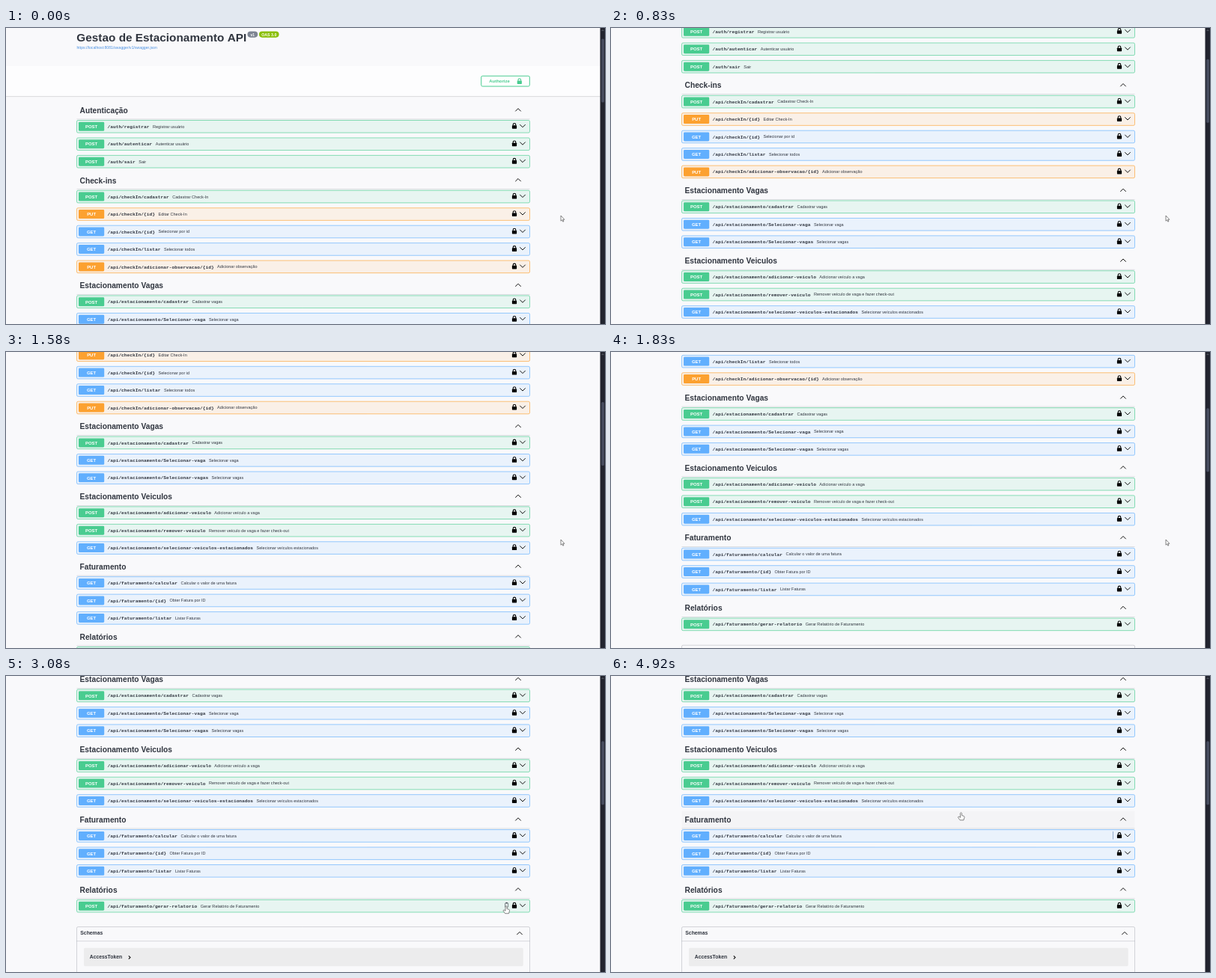
These frames come from a looping animation (800 by 396 pixels, 5 s). An HTML page with a canvas:

```html
<!DOCTYPE html>
<html lang="pt">
<head>
<meta charset="utf-8">
<title>API</title>
<style>
html, body { margin: 0; width: 100%; height: 100%; overflow: hidden; background: #f9f9fb; }
canvas { display: block; }
</style>
</head>
<body>
<canvas id="stage" width="800" height="396"></canvas>
<script>
const ctx = document.getElementById('stage').getContext('2d');
const SANS = '"Liberation Sans", Arial, sans-serif';
const MONO = '"Liberation Mono", monospace';
const INK = '#30353f', RULE = 'rgba(59,65,81,.26)', PAGE = '#f9f9fb';
const LEFT = 94.5, RIGHT = 699.5;
const LOOP = 5000, STEP = 1000 / 12;
const COLORS = { POST: '73,204,144', PUT: '252,161,48', GET: '97,175,254' };

const sections = [
  ['Autenticação',
    ['POST', '/auth/registrar', 'Registrar usuário'],
    ['POST', '/auth/autenticar', 'Autenticar usuário'],
    ['POST', '/auth/sair', 'Sair']],
  ['Check-ins',
    ['POST', '/api/checkIn/cadastrar', 'Cadastrar Check-In'],
    ['PUT', '/api/checkIn/{id}', 'Editar Check-In'],
    ['GET', '/api/checkIn/{id}', 'Selecionar por id'],
    ['GET', '/api/checkIn/listar', 'Selecionar todos'],
    ['PUT', '/api/checkIn/adicionar-observacao/{id}', 'Adicionar observação']],
  ['Estacionamento Vagas',
    ['POST', '/api/estacionamento/cadastrar', 'Cadastrar vagas'],
    ['GET', '/api/estacionamento/Selecionar-vaga', 'Selecionar vaga'],
    ['GET', '/api/estacionamento/Selecionar-vagas', 'Selecionar vagas']],
  ['Estacionamento Veiculos',
    ['POST', '/api/estacionamento/adicionar-veiculo', 'Adicionar veículo a vaga'],
    ['POST', '/api/estacionamento/remover-veiculo', 'Remover veículo de vaga e fazer check-out'],
    ['GET', '/api/estacionamento/selecionar-veiculos-estacionados', 'Selecionar veículos estacionados']],
  ['Faturamento',
    ['GET', '/api/faturamento/calcular', 'Calcular o valor de uma fatura'],
    ['GET', '/api/faturamento/{id}', 'Obter Fatura por ID'],
    ['GET', '/api/faturamento/listar', 'Listar Faturas']],
  ['Relatórios',
    ['POST', '/api/faturamento/gerar-relatorio', 'Gerar Relatório de Faturamento']]
];

// Lay headings and operations out down the page.
const items = [];
let flowY = 110;
for (const [title, ...ops] of sections) {
  items.push({ title, y: flowY });
  flowY += 21.8;
  ops.forEach(([verb, path, note], i) =>
    items.push({ verb, path, note, y: flowY + i * 23.45 }));
  flowY += (ops.length - 1) * 23.45 + 25.1;
}

const NOTCH = 340 / 6, NOTCH_TIME = 220;
const notches = [80, 300, 763, 1190, 1500, 1950];
const pointerPath = [
  [2420, 741, 251], [2580, 716, 170], [2750, 676, 30], [2920, 666, 150],
  [3080, 668, 307.5], [3250, 669, 230], [3420, 672, 30], [3580, 672, 170],
  [3830, 660, 308], [4080, 600, 190], [4330, 545, 255], [4580, 505, 200],
  [4750, 480, 212], [4830, 474, 166], [4917, 467.5, 182.5]
];

const ease = p => { p = Math.min(1, Math.max(0, p)); return p * p * (3 - 2 * p); };
const scrollAt = t => notches.reduce((s, start) => s + NOTCH * ease((t - start) / NOTCH_TIME), 0);

function pointerAt(t) {
  let prev = pointerPath[0];
  for (const next of pointerPath) {
    if (t < next[0]) {
      const k = ease((t - prev[0]) / (next[0] - prev[0] || 1));
      return [prev[1] + (next[1] - prev[1]) * k, prev[2] + (next[2] - prev[2]) * k];
    }
    prev = next;
  }
  return prev.slice(1);
}

// Type is set at ten times its size and scaled down to keep exact advances.
function text(str, x, baseline, size, color, { font = SANS, weight = 'bold', align = 'left' } = {}) {
  ctx.save();
  ctx.translate(x, baseline);
  ctx.scale(.1, .1);
  ctx.font = `${weight} ${size * 10}px ${font}`;
  ctx.textAlign = align;
  ctx.fillStyle = color;
  ctx.fillText(str, 0, 0);
  ctx.restore();
}

function box(x, y, w, h, r, fill, stroke, width = .65) {
  ctx.beginPath();
  ctx.roundRect(x, y, w, h, r);
  if (fill) { ctx.fillStyle = fill; ctx.fill(); }
  if (stroke) { ctx.strokeStyle = stroke; ctx.lineWidth = width; ctx.stroke(); }
}

function rect(x, y, w, h, color) {
  ctx.fillStyle = color;
  ctx.fillRect(x, y, w, h);
}

function line(points, color, width) {
  ctx.beginPath();
  points.forEach(([x, y]) => ctx.lineTo(x, y));
  ctx.strokeStyle = color;
  ctx.lineWidth = width;
  ctx.stroke();
}

function chevron(x, y, dir) {
  line([[x - 3.7, y - 1.8 * dir], [x, y + 1.9 * dir], [x + 3.7, y - 1.8 * dir]], '#111', 1);
}

function lock(x, y, color) {
  box(x - 3.1, y - .8, 6.2, 4.6, .7, color);
  ctx.beginPath();
  ctx.moveTo(x - 1.8, y - .5);
  ctx.lineTo(x - 1.8, y - 1.7);
  ctx.arc(x, y - 1.7, 1.8, Math.PI, 0);
  ctx.lineTo(x + 1.8, y - .5);
  ctx.strokeStyle = color;
  ctx.lineWidth = 1.1;
  ctx.stroke();
}

function drawHeader() {
  rect(0, 51, 794, 40, '#fdfdfe');
  rect(0, 91, 794, .8, 'rgba(0,0,0,.13)');
  rect(0, 91.8, 794, .7, 'rgba(0,0,0,.04)');
  text('Gestao de Estacionamento API', 94.3, 18.4, 15.36, INK);
  box(322.5, 4.5, 13.7, 8.2, 4.1, '#7d8492');
  text('v1', 329.3, 10.5, 5, '#fff', { align: 'center' });
  box(338, 4.5, 26.6, 8.2, 4.1, '#89bf04');
  text('OAS 3.0', 351.3, 10.6, 5.3, '#fff', { align: 'center' });
  text('https://localhost:8081/swagger/v1/swagger.json', 94.5, 27.9, 5.12, '#4990e2', { weight: 'normal' });
  box(634.7, 64.2, 64.6, 13.8, 1.7, '#fff', '#49cc90', 1);
  text('Authorize', 645.2, 73.4, 5.97, '#49cc90');
  lock(685.8, 71.2, '#49cc90');
}

function drawHeading({ title, y }, hovered) {
  if (hovered) rect(LEFT, y - 11.5, RIGHT - LEFT, 23, 'rgba(0,0,0,.02)');
  text(title, 98.5, y + 3.7, 10.24, INK);
  rect(LEFT, y + 11.6, RIGHT - LEFT, .6, RULE);
  chevron(684, y - .4, -1);
}

function drawOperation({ verb, path, note, y }, hovered) {
  const rgb = COLORS[verb];
  box(LEFT, y - 8.3, RIGHT - LEFT, 16.6, 1.7, `rgba(${rgb},.1)`, `rgb(${rgb})`);
  box(97, y - 6, 34.2, 12, 1.4, `rgb(${rgb})`);
  text(verb, 114.1, y + 2.2, 5.97, '#fff', { align: 'center' });
  text(path, 135.4, y + 2.1, 6.24, INK, { font: MONO });
  text(note, 139.8 + path.length * 3.745, y + 1.9, 5.55, INK, { weight: 'normal' });
  if (hovered) {
    box(666.6, y - 4, 4, 5.6, .6, null, INK, .6);
    rect(667.6, y - 4.8, 2, 1.4, INK);
  }
  lock(679, y - .8, '#000');
  chevron(690, y - .9, 1);
}

function drawSchemas() {
  box(LEFT, 675.6, RIGHT - LEFT, 90, 1.7, null, RULE, .8);
  text('Schemas', 99.3, 686.3, 6.83, INK, { weight: '600' });
  rect(LEFT, 694.4, RIGHT - LEFT, .7, RULE);
  chevron(686, 684.3, -1);
  box(104, 703.8, 586.8, 24.4, 1.7, '#ececed');
  text('AccessToken', 111.7, 718.3, 6.83, INK);
  line([[163.8, 714.3], [166, 716.5], [163.8, 718.7]], '#111', 1.1);
}

function drawScrollbar(scroll) {
  rect(793.5, 0, 6.5, 396, '#22242f');
  box(795.2, 14.5 + scroll * .214, 3.8, 85, 1.5, '#474c5e');
  line([[795.6, 4], [797, 2.6], [798.4, 4]], '#777b86', .8);
}

function drawPointer(x, y, hand) {
  ctx.save();
  ctx.translate(x, y);
  ctx.lineJoin = 'round';
  const outline = new Path2D(hand
    ? 'M-1 1Q0-.8 1 1V4L3.9 5Q4.8 5.4 4.4 7L3.5 10.3H-1.4L-3.8 7Q-4.2 5.6-2.7 5.6L-1 6.8Z'
    : 'M0 0V7.2L1.7 5.8L2.8 8.2L3.9 7.7L2.8 5.3H4.9Z');
  ctx.fillStyle = '#fff';
  ctx.strokeStyle = '#444';
  ctx.lineWidth = .65;
  ctx.fill(outline);
  ctx.stroke(outline);
  ctx.restore();
}

function draw(t) {
  const scroll = scrollAt(t);
  const [px, py] = pointerAt(t);
  const hot = px > LEFT && px < RIGHT && items.find(it =>
    Math.abs(py + scroll - it.y) < (it.title ? 11.5 : 8.3));

  rect(0, 0, 800, 396, PAGE);
  ctx.save();
  ctx.translate(0, -scroll);
  drawHeader();
  for (const item of items) (item.title ? drawHeading : drawOperation)(item, item === hot);
  drawSchemas();
  ctx.restore();
  if (t > 4760) rect(670, 208, .9, 10.5, '#8ea6c8');
  drawScrollbar(scroll);
  drawPointer(px, py, Boolean(hot));
}

let start;
function tick(now) {
  start ??= now;
  const t = (now - start) % LOOP;
  draw(Math.min(59, Math.floor((t + 4) / STEP)) * STEP);
  requestAnimationFrame(tick);
}
draw(0);
requestAnimationFrame(tick);
</script>
</body>
</html>
```
